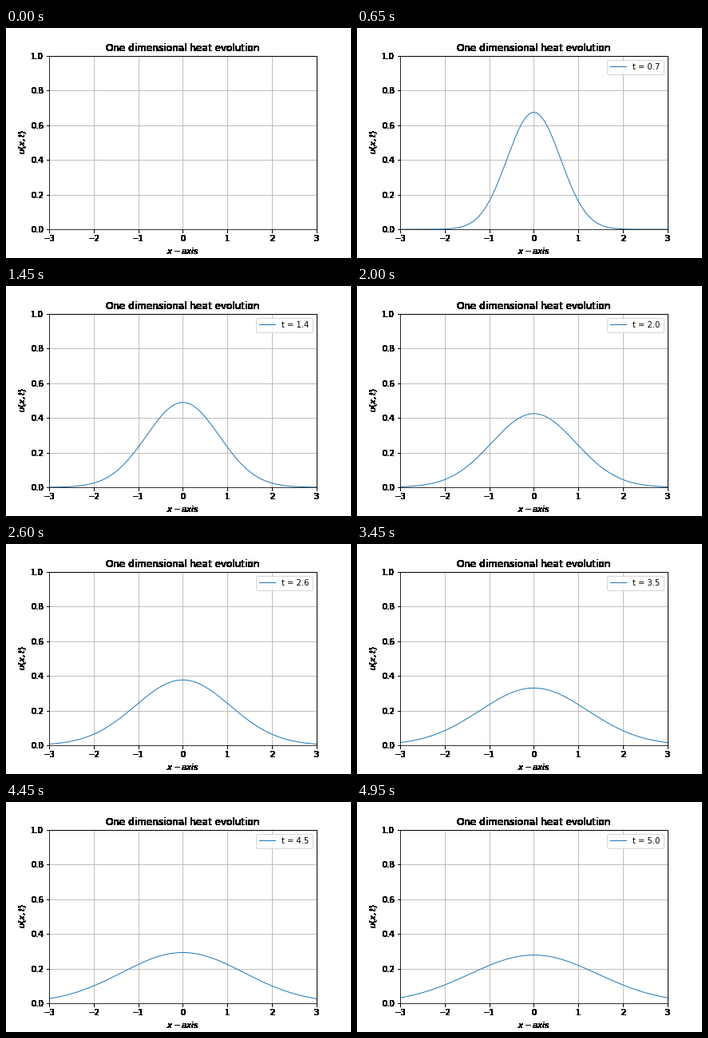
A matplotlib script that plays this animation: 432 by 288 pixels, repeating every 5000 ms.

```python
import math

import matplotlib.pyplot as plt
import numpy as np
from matplotlib.animation import FuncAnimation

FRAMES = 100
INTERVAL = 50
DIFFUSIVITY = 0.2
HALF_WIDTH = 0.5

plt.rcParams["figure.subplot.bottom"] = 0.125
plt.rcParams["text.kerning_factor"] = 6

erf = np.vectorize(math.erf)


def heat(x, t):
    """Temperature at time t after a unit block around x = 0 starts to spread."""
    spread = 2 * math.sqrt(DIFFUSIVITY * t)
    return (erf((x + HALF_WIDTH) / spread) - erf((x - HALF_WIDTH) / spread)) / 2


def harden(image, dpi):
    """Turn every touched pixel solid black."""
    solid = np.zeros_like(image)
    solid[..., 3] = image[..., 3] > 0
    return solid, 0, 0


fig, ax = plt.subplots(figsize=(6, 4), dpi=72)
ax.set_xlim(-3, 3)
ax.set_ylim(0, 1)
ax.set_xticks(range(-3, 4))
ax.set_yticks(np.linspace(0, 1, 6))
ax.grid(True)

# Everything outside the plot area has hard edges.
outside = [
    ax.set_title("One dimensional heat evolution"),
    ax.set_xlabel("$x-axis$"),
    ax.set_ylabel("$u(x,t)$"),
    ax.spines["top"],
    ax.spines["right"],
]
for axis in (ax.xaxis, ax.yaxis):
    for tick in axis.get_major_ticks():
        outside += [tick.label1, tick.tick1line]
for artist in outside:
    artist.set_agg_filter(harden)

x = np.linspace(-3, 3, 301)
line, = ax.plot([], [], lw=1, label="t = 0.0")
legend = ax.legend(loc="upper right")
time_label = legend.get_texts()[0]


def update(i):
    t = i / 20
    legend.set_visible(i > 0)
    if i == 0:
        line.set_data([], [])
    else:
        line.set_data(x, heat(x, t))
        time_label.set_text(f"t = {t:.1f}")
    return line, legend


anim = FuncAnimation(fig, update, frames=FRAMES, interval=INTERVAL,
                     repeat=True, repeat_delay=0, blit=False)
plt.show()
```
